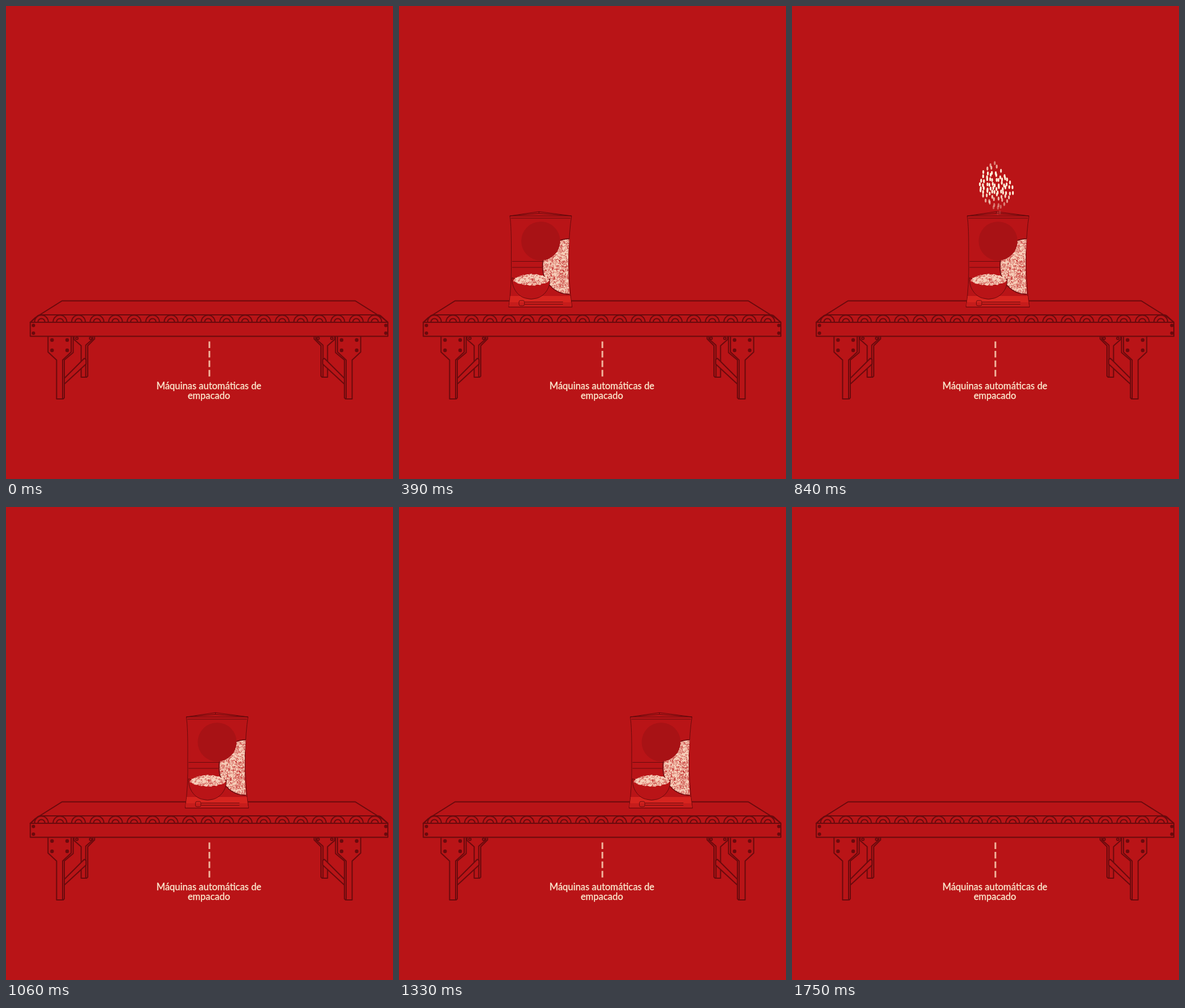
Recreate the animation shown at these times as an HTML page. Size 677x827 px, loop 1.78 s.

```html
<!DOCTYPE html>
<html lang="es">
<head>
<meta charset="utf-8">
<title>Empacado</title>
<style>
  html, body { margin: 0; height: 100%; overflow: hidden; background: #b91417; }
  svg { display: block; width: 100vw; height: 100vh; }
  .line { fill: #b91417; stroke: #6a0a0d; stroke-width: 2; stroke-linejoin: round; }
  .open { fill: none; }
  .thin { stroke: #5f090c; stroke-width: .9; }
  .rice { fill: #f6cdb8; }
  .specks { fill: none; stroke: #b91417; stroke-width: .6; }
  text {
    font: 16.45px Lato, "Open Sans", sans-serif; text-anchor: middle;
    fill: #fdebd0; stroke: #fdebd0; stroke-width: .3;
  }
</style>
</head>
<body>
<svg viewBox="0 0 677 827">
  <defs>
    <clipPath id="window"><path d="M106 407A47 48.5 0 1 0 106.5 504Q102 455 106 407Z"/></clipPath>
    <clipPath id="heapClip"><path class="heap"/></clipPath>
    <g id="legs" class="line">
      <path d="M119 578V583L131.5 594V649H141L143 647V594L155 582V578"/>
      <path class="open" d="M139.5 649V593L152 582V578"/>
      <circle cx="124" cy="581" r="2"/><circle cx="148" cy="581" r="2"/>
      <path d="M101 652L137 616L140 618V626L101 662Z"/>
      <path d="M73.5 578V605L88.5 619V687H100L102 685V619L117.5 606V578"/>
      <path class="open" d="M99 687V619L114 605V578"/>
      <g fill="#6a0a0d" stroke="none">
        <circle cx="80.5" cy="584" r="3.2"/><circle cx="107" cy="584" r="3.2"/>
        <circle cx="80.5" cy="602" r="3.2"/><circle cx="107" cy="602" r="3.2"/>
      </g>
    </g>
  </defs>

  <rect width="677" height="827" fill="#b91417"/>
  <use href="#legs"/>
  <use href="#legs" transform="translate(694) scale(-1 1)"/>
  <g class="line">
    <path d="M98 515.5H611L658 545L668 553H42.5L51 545Z"/>
    <path class="open" d="M43 553L54 543Q57 540 61 540H650Q654 540 657 543L668 553"/>
    <path id="rollers" class="open"/>
    <rect x="42.5" y="553" width="625.5" height="24.5"/>
    <g fill="#6a0a0d" stroke="none">
      <circle cx="48" cy="558.5" r="3"/><circle cx="48" cy="572" r="3"/>
      <circle cx="664.5" cy="558.5" r="3"/><circle cx="664.5" cy="572" r="3"/>
    </g>
  </g>

  <path d="M355.8 586.5V648" stroke="#f0b49c" stroke-width="3" stroke-dasharray="11.5 5.1"/>
  <text x="355" y="669.5">Máquinas automáticas de</text>
  <text x="355" y="686.5">empacado</text>

  <g id="bag">
    <path class="line thin" d="M2 367L53 359.5L110 367Q106 392 105 430Q104 485 111 526.5H0Q5.5 490 4.5 440Q5 385 2 367Z"/>
    <path d="M2.8 507H108L110 525H.6Z" fill="#d6241f"/>
    <path d="M1.5 518H109L110 525H.6Z" fill="#c61c1b"/>
    <g class="line thin open">
      <path d="M2 367H110M2 367L53 362.5L110 367M4 371H108M53 359.5V362.5"/>
      <path d="M6 446.5H60M6 457H58M28 517.5H95M28 521.5H95"/>
      <rect x="18" y="515" width="9.5" height="9" rx="2.5"/>
    </g>
    <g clip-path="url(#window)">
      <rect class="rice" x="60" y="405" width="50" height="100"/>
      <path id="windowSpecks" class="specks"/>
    </g>
    <path class="line open" style="stroke-width:1.5" d="M106 407A47 48.5 0 1 0 106.5 504"/>
    <path class="line thin" d="M6 475C5 496 19 509 30 511Q39 514 49 511C60 508 73 496 72 477Q40 492 6 475Z"/>
    <path class="rice heap"/>
    <g clip-path="url(#heapClip)"><path id="heapSpecks" class="specks"/></g>
    <circle cx="56" cy="411" r="34" fill="#a81215"/>
  </g>
  <g id="grains"></g>
</svg>

<script>
const $ = id => document.getElementById(id);
const clamp = v => Math.max(0, Math.min(1, v));

let seed = 7;
const rand = (a = 0, b = 1) => {
  seed = seed * 16807 % 2147483647;
  return a + (b - a) * seed / 2147483647;
};

// Short strokes in random directions that separate the rice grains
function specks(id, x0, y0, x1, y1, count) {
  let d = "";
  for (let i = 0; i < count; i++) {
    const a = rand(0, 6.28), len = rand(1.5, 3.5);
    d += `M${rand(x0, x1).toFixed(1)} ${rand(y0, y1).toFixed(1)}` +
         `l${(len * Math.cos(a)).toFixed(1)} ${(len * Math.sin(a)).toFixed(1)}`;
  }
  $(id).setAttribute("d", d);
}
specks("windowSpecks", 60, 405, 110, 505, 1050);
specks("heapSpecks", 7, 467, 72, 491, 210);

let heap = "";
for (let i = 0; i < 64; i++) {
  const a = i / 64 * 2 * Math.PI, s = Math.sin(a);
  const x = 39.5 + 31 * Math.cos(a) + rand(-1, 1);
  const y = 480 + (s < 0 ? 11 : 8.5) * Math.sign(s) * Math.abs(s) ** 1.2 + rand(-1.1, 1.1);
  heap += `${i ? "L" : "M"}${x.toFixed(1)} ${y.toFixed(1)}`;
}
document.querySelectorAll(".heap").forEach(p => p.setAttribute("d", heap + "Z"));

let arcs = "";
for (let i = 0; i < 19; i++)
  for (const r of [12, 6]) arcs += `M${62 + 32.4 * i - r} 552.5a${r} ${r} 0 0 1 ${2 * r} 0`;
$("rollers").setAttribute("d", arcs);

// Falling cluster: [y, centre x, half width] profile
const profile = [[274, 350, 7], [288, 350, 17], [304, 354, 26], [322, 358, 31],
                 [336, 357, 26], [348, 358, 14], [361, 362, 4]];
const grains = [];
for (let y = 276; y < 361; y += 7) {
  const i = profile.findIndex(p => p[0] > y);
  const [p, q] = [profile[i - 1], profile[i]];
  const f = (y - p[0]) / (q[0] - p[0]);
  const mid = p[1] + f * (q[1] - p[1]), half = p[2] + f * (q[2] - p[2]);
  const n = Math.max(2, Math.round(half / (y > 300 && y < 330 ? 2.6 : 3.9)));
  for (let k = 0; k < n; k++) {
    const el = document.createElementNS("http://www.w3.org/2000/svg", "ellipse");
    el.setAttribute("rx", 1.6);
    el.setAttribute("ry", 3.4);
    el.setAttribute("fill", "#fff0d9");
    $("grains").append(el);
    grains.push({ el, x: mid + half * (2 * (k + .5) / n - 1) + rand(-1.6, 1.6), y: y + rand(-3, 3) });
  }
}

// The bag rolls in, waits to be filled, then rolls on
const bagX = t => t < 662 ? 43 + .4136 * (t - 30) : 304.5 + .33 * Math.max(0, t - 1033);

function draw(t) {
  $("bag").setAttribute("transform", `translate(${bagX(t).toFixed(2)})`);
  $("bag").setAttribute("opacity", Math.min(clamp(t / 100), clamp((1730 - t) / 100)));
  const fall = .42 * (t - 840);
  for (const g of grains) {
    const y = g.y + fall;
    g.el.setAttribute("cx", g.x);
    g.el.setAttribute("cy", y);
    g.el.setAttribute("opacity", Math.min(clamp((y - 259) / 32), clamp((366 - y) / 40)));
  }
}

const start = performance.now();
function frame() {
  const t = (performance.now() - start) % 1780;
  const shift = t < 1000 ? 0 : 10;
  draw(Math.floor((t - shift) / 30) * 30 + shift);
  requestAnimationFrame(frame);
}
frame();
</script>
</body>
</html>
```
